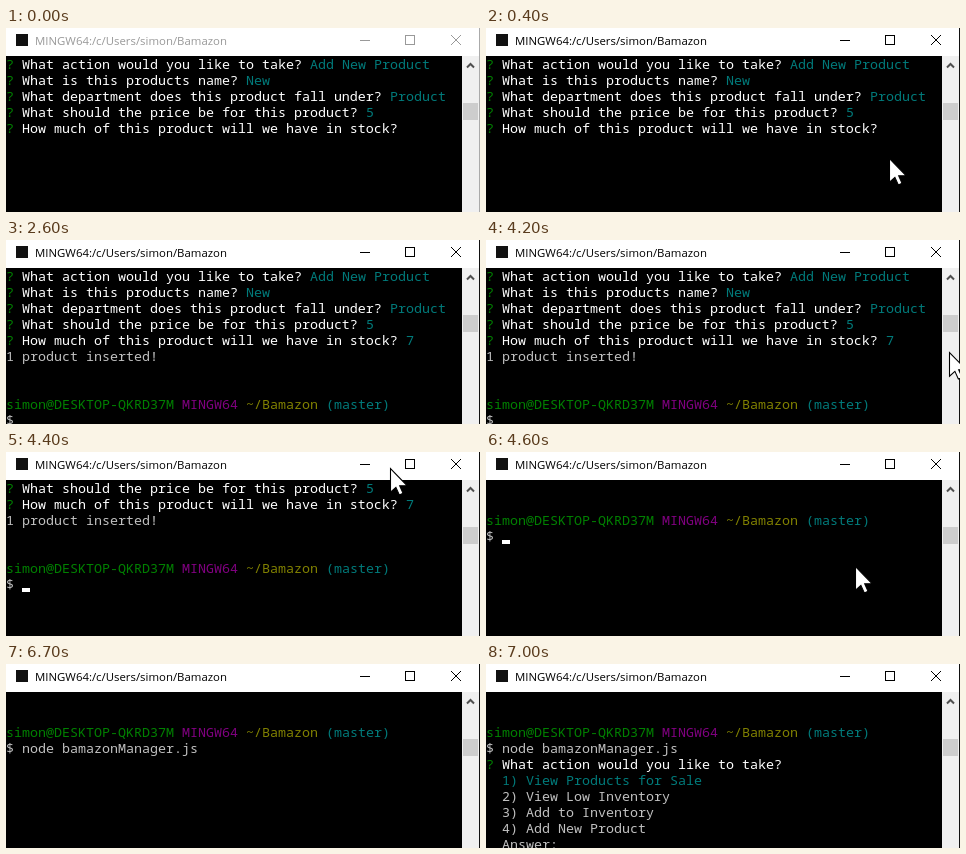
Write an HTML page with a canvas that moves like this. It is 474 by 184 pixels and loops after 8000 ms.

```html
<!DOCTYPE html>
<html lang="en">
<head>
<meta charset="utf-8">
<title>Terminal</title>
<style>
html, body { margin: 0; width: 100%; height: 100%; overflow: hidden; background: #000; }
canvas { display: block; }
</style>
</head>
<body>
<canvas id="stage" width="474" height="184"></canvas>
<script>
const ctx = document.getElementById('stage').getContext('2d');
const LOOP = 8000, TICK = 100;
const CELL = 8, ROW = 16, TOP = 28;
const WHITE = '#fff', GRAY = '#c0c0c0', GREEN = '#008000', CYAN = '#007a7a',
      PURPLE = '#800080', OLIVE = '#808000';
const HOVER = [404, 131], CORNER = [474, 184];

const within = (t, from, to) => t >= from && t < to;
const clamp = (v, min, max) => Math.max(min, Math.min(max, v));
const glide = (a, b, k) => a.map((v, i) => Math.round(v + (b[i] - v) * k));

const plain = (text, color = GRAY) => [[color, text]];
const ask = (text, answer = '', color = CYAN) =>
  [[GREEN, '? '], [WHITE, text + ' '], [color, answer]];

function getLines(t) {
  const lines = [
    ask('What action would you like to take?', 'Add New Product'),
    ask('What is this products name?', 'New'),
    ask('What department does this product fall under?', 'Product'),
    ask('What should the price be for this product?', '5'),
    ask('How much of this product will we have in stock?',
      t >= 1900 ? '7' : '', t >= 2500 ? CYAN : GRAY)
  ];
  if (within(t, 2500, 2600)) lines.push(plain(''));
  if (t >= 2600) {
    lines.push(plain('1 product inserted!'), [], [],
      [[GREEN, 'simon@DESKTOP-QKRD37M '], [PURPLE, 'MINGW64 '],
       [OLIVE, '~/Bamazon '], [CYAN, '(master)']],
      plain('$ ' + (t >= 5800 ? 'node bamazonManager.js' : '')));
  }
  if (within(t, 6300, 7000)) lines.push(plain(''));
  if (t >= 7000) {
    lines.push(ask('What action would you like to take?'),
      plain('  1) View Products for Sale', CYAN),
      plain('  2) View Low Inventory'),
      plain('  3) Add to Inventory'),
      plain('  4) Add New Product'),
      plain('  Answer:'));
  }
  return lines;
}

// The wheel turns two notches of three lines each.
const getScroll = t => 3 * clamp(Math.floor((t - 4200) / 200), 0, 2);

const caretOn = t =>
  within(t, 900, 1400) || within(t, 1900, 5000) ||
  within(t, 5700, 6200) || within(t, 6300, 6700);

function getPointer(t) {
  const now = Math.floor(t / TICK) * TICK;
  if (within(t, 100, 700)) return glide(HOVER, CORNER, Math.abs(now - 400) / 350);
  if (within(t, 4200, 4600)) {
    return glide([464, 113], [385, 17], Math.min(1, (now - 4200) / 200));
  }
  if (within(t, 4600, 5000)) return [370, 115];
  if (within(t, 5000, 5100)) return HOVER;
}

function box(color, x, y, w, h) {
  ctx.fillStyle = color;
  ctx.fillRect(x, y, w, h);
}

function trace(...points) {
  ctx.beginPath();
  points.forEach(([x, y]) => ctx.lineTo(x, y));
}

function drawTerminal(t) {
  const scroll = getScroll(t);
  box('#000', 0, TOP, 456, 156);
  ctx.font = '500 13.333px "Noto Sans Mono", "DejaVu Sans Mono", monospace';
  let col = 0, y = TOP;
  getLines(t).slice(scroll).forEach((runs, i) => {
    col = 0;
    y = TOP + i * ROW;
    for (const [color, text] of runs) {
      ctx.fillStyle = color;
      ctx.fillText(text, col * CELL, y + 13);
      col += text.length;
    }
  });
  // The caret waits at the end of the last line.
  if (caretOn(t)) box(WHITE, col * CELL, y + 12, CELL, 4);
}

function drawTitleBar(ink) {
  box(WHITE, 0, 0, 474, TOP);
  box('#111', 10, 6, 12, 12);
  ctx.fillStyle = ink;
  ctx.font = '11.4px "Open Sans", "Noto Sans", sans-serif';
  ctx.fillText('MINGW64:/c/Users/simon/Bamazon', 29, 17);

  box(ink, 354, 12, 10, 1);
  ctx.strokeStyle = ink;
  ctx.lineWidth = 1;
  ctx.strokeRect(399.5, 7.5, 9, 9);
  trace([445, 7], [455, 17]);
  ctx.stroke();
  trace([455, 7], [445, 17]);
  ctx.stroke();
}

function drawScrollBar() {
  box('#f0f0f0', 456, TOP, 17, 156);
  box('#cdcdcd', 457, 75, 15, 17);
  ctx.strokeStyle = '#505050';
  ctx.lineWidth = 2;
  trace([461, 39.5], [464.5, 36], [468, 39.5]);
  ctx.stroke();
}

function drawPointer(t) {
  const tip = getPointer(t);
  if (!tip) return;
  ctx.save();
  ctx.translate(tip[0] - 0.5, tip[1] - 0.5);
  ctx.scale(1.08, 1.08);
  trace([0, 0], [0, 22], [5, 17.5], [8.2, 24.5], [11.6, 23], [8.5, 16], [15.5, 16]);
  ctx.closePath();
  ctx.fillStyle = WHITE;
  ctx.fill();
  ctx.strokeStyle = '#000';
  ctx.lineWidth = 1;
  ctx.stroke();
  ctx.restore();
}

function draw() {
  const t = performance.now() % LOOP;
  const active = t >= 300;
  drawTerminal(t);
  drawTitleBar(active ? '#000' : '#999');
  drawScrollBar();
  box(active ? '#111' : '#aaa', 473, 0, 1, 184);
  drawPointer(t);
  requestAnimationFrame(draw);
}
draw();
</script>
</body>
</html>
```
